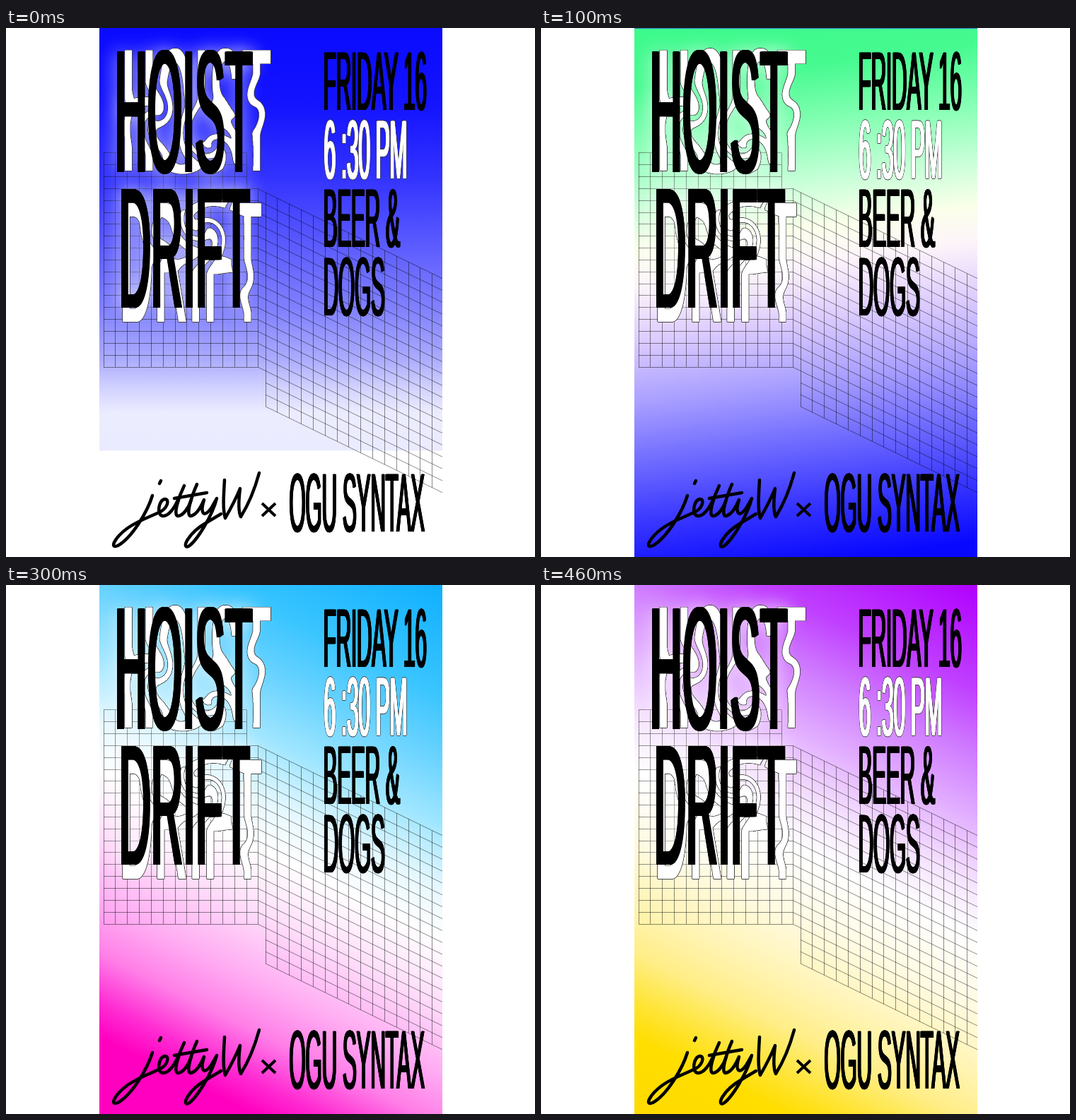
An HTML page with a canvas that plays this animation: 748 by 749 pixels, repeating every 500 ms.

```html
<!DOCTYPE html>
<html lang="en">
<head>
<meta charset="utf-8">
<title>Poster</title>
<style>
  html, body { margin: 0; width: 100%; height: 100%; overflow: hidden; background: #fff; }
  canvas { display: block; }
</style>
</head>
<body>
<canvas id="stage" width="748" height="749"></canvas>
<script>
const W = 748, H = 749, LEFT = 132, RIGHT = 617;
const STEP = 100;
const TALL = 3.93; // vertical stretch of the poster type
const TITLE = ['HOIST', 'DRIFT'];
const ctx = document.getElementById('stage').getContext('2d');

// tilt: rise of the colour bands per pixel; stops: [y at the left edge, colour]
const themes = [
  { tilt: 0, stops: [[0, '#0a0aff'], [110, '#1414ff'], [210, '#3232ff'], [300, '#5858ff'],
    [400, '#8282ff'], [470, '#acacff'], [510, '#d2d2ff'], [545, '#ececff'], [598, '#ebebff'],
    [599, '#ffffff'], [749, '#ffffff']] },
  { tilt: -0.13, edge: '#2a70cc', stops: [[0, '#3cfa8c'], [85, '#46fa90'], [170, '#86ffb4'],
    [250, '#c8ffd8'], [315, '#fbffea'], [365, '#fdf4fa'], [445, '#dccbff'], [530, '#aaa0ff'],
    [615, '#706cff'], [700, '#3a38ff'], [790, '#0808ff']] },
  { tilt: 0.02, stops: [[0, '#fbd04c'], [100, '#fcd45c'], [200, '#ffe298'], [300, '#fff5d6'],
    [370, '#ffffff'], [430, '#dcf3ff'], [500, '#a2daff'], [570, '#68bcff'], [620, '#56b2ff'],
    [749, '#40a4ff']] },
  { tilt: 0.5, stops: [[-242, '#10b0ff'], [-90, '#38c4ff'], [0, '#66d2ff'], [100, '#a0e6ff'],
    [190, '#e6f8ff'], [260, '#ffffff'], [350, '#ffdefa'], [450, '#ffacf2'], [520, '#ff80e8'],
    [590, '#ff2cd2'], [640, '#ff00c0'], [749, '#ff00c0']] },
  { tilt: 0.5, stops: [[-242, '#b000ff'], [-90, '#c040ff'], [0, '#d07cff'], [100, '#e4b4ff'],
    [190, '#f6e6ff'], [260, '#ffffff'], [360, '#fffae0'], [450, '#fff4b4'], [520, '#ffee88'],
    [590, '#ffe434'], [640, '#ffde00'], [749, '#ffda00']] }
];

function makeCanvas(w, h) {
  return Object.assign(document.createElement('canvas'), { width: w, height: h });
}

function paintBackground(g, { tilt, stops, edge }) {
  const start = stops[0][0], span = stops[stops.length - 1][0] - start;
  const reach = span / (1 + tilt * tilt);
  const fill = g.createLinearGradient(LEFT, start, LEFT - tilt * reach, start + reach);
  for (const [y, color] of stops) fill.addColorStop((y - start) / span, color);
  g.fillStyle = '#fff';
  g.fillRect(0, 0, W, H);
  g.fillStyle = fill;
  g.fillRect(LEFT, 0, RIGHT - LEFT, H);
  if (edge) {
    g.fillStyle = edge;
    g.fillRect(LEFT, 0, RIGHT - LEFT, 1);
  }
}

// Tall type, thickened sideways by `weight` pixels on each side.
function label(g, text, x, base, size, weight, color, spacing = 0) {
  g.save();
  g.translate(x, base);
  g.scale(1, TALL);
  g.font = `${size}px "Liberation Sans", Arial, sans-serif`;
  g.letterSpacing = `${spacing}px`;
  g.textRendering = 'geometricPrecision';
  g.fillStyle = color;
  for (let d = -weight; d <= weight + 0.01; d += weight / 4) g.fillText(text, d, 0);
  g.restore();
}

function smallLabel(g, text, x, base, color = '#000') {
  label(g, text, x, base, 30, 0.9, color, -0.3);
}

function drawGrid(g) {
  const cell = 16.84, slope = 0.487, rows = 18, cols = 13;
  const x0 = 138, bottom = 480, fold = 367, low = 536;
  const crisp = v => Math.floor(v) + 0.5;
  const line = (x1, y1, x2, y2) => { g.moveTo(x1, y1); g.lineTo(x2, y2); };
  const drop = x => (x - fold) * slope;
  g.beginPath();
  for (let i = 0; i <= cols; i++) {
    const x = crisp(x0 + i * cell);
    line(x, bottom, x, bottom - cell * (i < cols ? rows : rows - 3));
  }
  for (let i = 0; i <= rows; i++) {
    const y = crisp(bottom - i * cell);
    line(x0, y, x0 + cell * (i > 15 ? cols - 1 : cols), y);
  }
  for (let x = fold; x < RIGHT; x += cell) {
    line(crisp(x), low + drop(x), crisp(x), low - rows * cell + drop(x));
  }
  for (let i = 0; i <= rows; i++) {
    const y = low - i * cell, x = i < 3 ? fold : fold - 10;
    line(x, y + drop(x), RIGHT, y + drop(RIGHT));
  }
  g.strokeStyle = 'rgba(0,0,0,.5)';
  g.lineWidth = 0.9;
  g.stroke();
}

// Title echo, liquified by a few twirls: [x, y, radius, turn]
function makeEcho() {
  const scale = 2, w = W * scale, h = 440 * scale;
  const twirls = [[290, 165, 70, 3.2], [352, 108, 46, 1.3], [212, 128, 55, -2],
    [278, 285, 65, 3.2], [334, 365, 42, -0.9], [222, 300, 45, 1.6]];
  const canvas = makeCanvas(w, h), g = canvas.getContext('2d');
  g.scale(scale, scale);
  label(g, TITLE[0], 165, 202, 63, 2, '#fff', 4);
  label(g, TITLE[1], 162, 416, 62, 2, '#fff', 4);
  const from = g.getImageData(0, 0, w, h), to = g.createImageData(w, h);
  const source = new Uint32Array(from.data.buffer), result = new Uint32Array(to.data.buffer);
  for (let j = 0; j < h; j++) {
    for (let i = 0; i < w; i++) {
      let x = i / scale, y = j / scale;
      for (const [cx, cy, radius, turn] of twirls) {
        const dx = x - cx, dy = y - cy, near = 1 - Math.hypot(dx, dy) / radius;
        if (near <= 0) continue;
        const a = turn * near * near, c = Math.cos(a), s = Math.sin(a);
        x = cx + dx * c - dy * s;
        y = cy + dx * s + dy * c;
      }
      const u = Math.round(x * scale), v = Math.round(y * scale);
      if (u >= 0 && v >= 0 && u < w && v < h) result[j * w + i] = source[v * w + u];
    }
  }
  g.putImageData(to, 0, 0);
  return canvas;
}

function drawEcho(g) {
  const echo = makeEcho();
  const edge = makeCanvas(echo.width, echo.height), e = edge.getContext('2d');
  e.drawImage(echo, 0, 0);
  e.globalCompositeOperation = 'source-in';
  e.fillStyle = '#333';
  e.fillRect(0, 0, edge.width, edge.height);
  const place = (image, dx, dy) => g.drawImage(image, dx, dy, W, 440);
  for (let a = 0; a < 8; a++) {
    place(edge, 0.6 * Math.cos(a * Math.PI / 4), 0.6 * Math.sin(a * Math.PI / 4));
  }
  place(echo, 0, 0);
}

function drawTitle(g) {
  label(g, TITLE[0], 154, 203.5, 63, 2, '#000', 0.5);
  label(g, TITLE[1], 160, 396, 62, 2, '#000', 0.5);
}

function drawGlow(g) {
  const layer = makeCanvas(W, H);
  drawTitle(layer.getContext('2d'));
  g.save();
  g.shadowColor = 'rgba(255,255,255,.85)';
  g.shadowBlur = 26;
  g.drawImage(layer, 0, 0);
  g.restore();
}

function drawScript(g) {
  const strokes = [
    'M207 662C200 685 178 722 158 733C146 738 153 722 172 708C188 697 204 692 216 686' +
      'C228 681 232 668 225 667C216 667 212 690 222 691C230 691 238 680 243 668',
    'M217 645l2-4',
    'M252 648C244 664 236 690 243 691C250 691 258 680 262 668',
    'M270 646C262 664 254 690 261 691C268 690 274 682 280 668' +
      'C274 688 280 694 290 680L298 666C292 690 270 726 258 734C248 738 256 716 284 700L304 688',
    'M238 666L284 658',
    'M309 640C308 660 306 680 310 694C318 680 326 664 331 652' +
      'C329 668 328 684 332 692C342 676 352 652 358 630'
  ];
  g.strokeStyle = '#000';
  g.lineCap = g.lineJoin = 'round';
  g.lineWidth = 4.5;
  for (const d of strokes) g.stroke(new Path2D(d));
  g.lineCap = 'butt';
  g.lineWidth = 4;
  g.stroke(new Path2D('M362 673L381 691M381 673L362 691'));
}

function makeOverlay() {
  const canvas = makeCanvas(W, H), g = canvas.getContext('2d');
  drawGrid(g);
  drawGlow(g);
  drawEcho(g);
  drawTitle(g);
  smallLabel(g, 'FRIDAY 16', 448.5, 115.5);
  for (const [dx, dy] of [[-0.6, 0], [0.6, 0], [0, -0.6], [0, 0.6]]) {
    smallLabel(g, '6 :30 PM', 449.5 + dx, 213 + dy, '#444');
  }
  smallLabel(g, '6 :30 PM', 449.5, 213, '#fff');
  smallLabel(g, 'BEER &', 448.5, 309.5);
  smallLabel(g, 'DOGS', 448.5, 406.5);
  smallLabel(g, 'OGU SYNTAX', 400.4, 712.5);
  drawScript(g);
  return canvas;
}

const overlay = makeOverlay();
let shown = -1;

function tick() {
  const index = Math.floor(performance.now() / STEP) % themes.length;
  if (index !== shown) {
    shown = index;
    paintBackground(ctx, themes[index]);
    ctx.drawImage(overlay, 0, 0);
  }
  requestAnimationFrame(tick);
}
tick();
</script>
</body>
</html>
```
